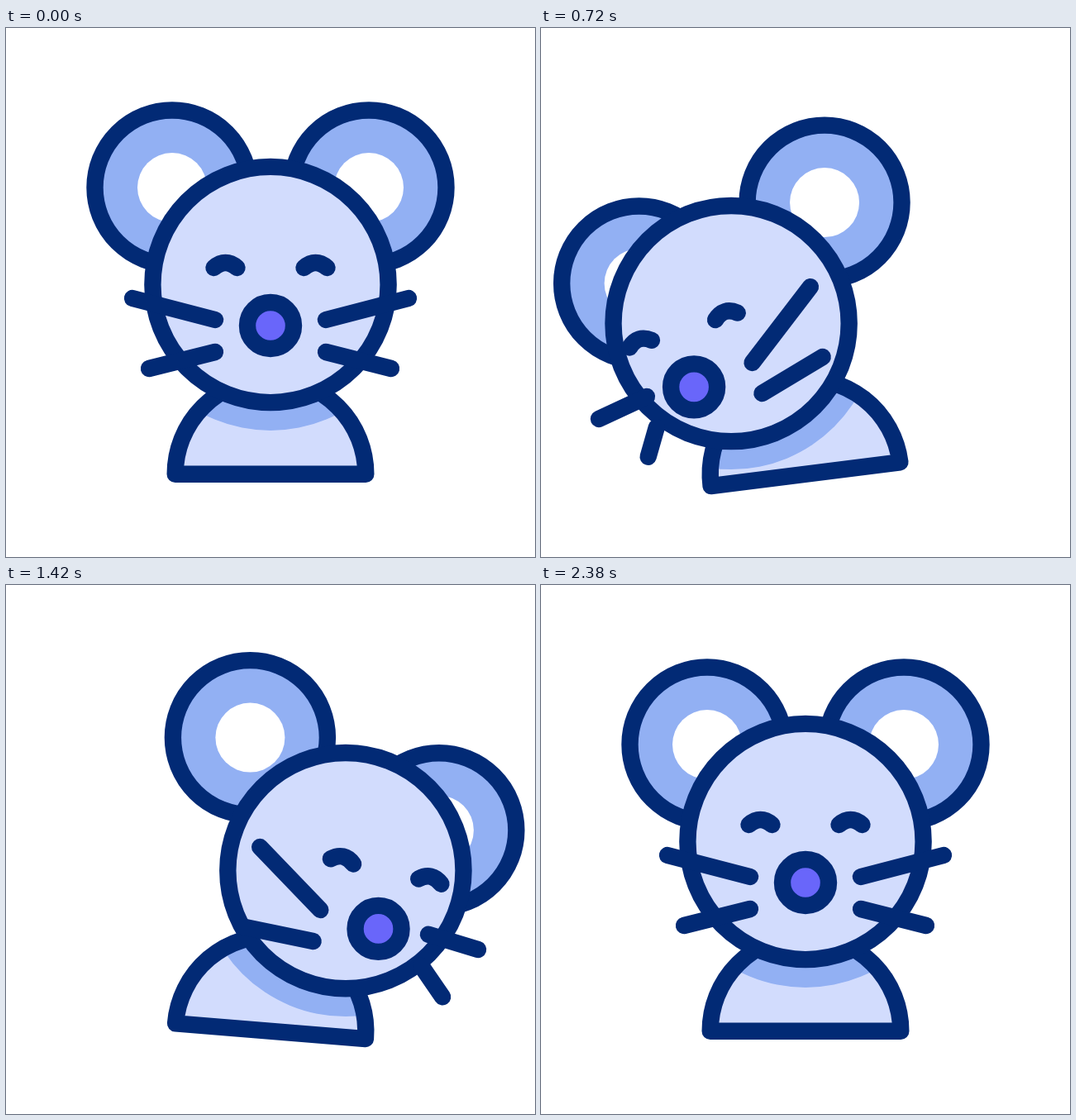
Write an HTML page with a canvas that moves like this. It is 640 px wide and 640 px high and loops after 2400 ms.

```html
<!DOCTYPE html>
<html lang="en">
<head>
<meta charset="utf-8">
<title>Mouse</title>
<style>
html, body { margin: 0; width: 100%; height: 100%; overflow: hidden; background: #fff; }
canvas { display: block; }
</style>
</head>
<body>
<canvas id="stage" width="640" height="640"></canvas>
<script>
const ctx = document.getElementById('stage').getContext('2d');
const LOOP = 2400, DEG = Math.PI / 180;
const NAVY = '#022a75', PALE = '#d2dcfd', BLUE = '#92b0f3', VIOLET = '#6966fa';

// Poses: rest, lean left, swing right, return, nod up, nod down, rest.
const TIMES = [0, 320, 610, 720, 1140, 1410, 1660, 1820, 2000, 2190, 2380];

// Smooth curve through the poses, with zero speed at both ends.
function track(...v) {
  const speed = i => (v[i + 1] - v[i]) / (TIMES[i + 1] - TIMES[i]);
  const slopes = v.map((_, i) => {
    if (i === 0 || i === v.length - 1) return 0;
    const before = TIMES[i] - TIMES[i - 1], after = TIMES[i + 1] - TIMES[i];
    return (after * speed(i - 1) + before * speed(i)) / (before + after);
  });
  return t => {
    const next = TIMES.findIndex(k => k > t);
    if (next < 0) return v[v.length - 1];
    const i = next - 1, span = TIMES[next] - TIMES[i], s = (t - TIMES[i]) / span;
    const blend = s * s * (3 - 2 * s);
    return v[i] * (1 - blend) + v[next] * blend +
      span * s * (1 - s) * (slopes[i] * (1 - s) - slopes[next] * s);
  };
}

const bodyTilt = track(0, -4, -7.5, -7.2, 2.3, 4.7, 1.9, 0.4, 0, 0, 0);
const head = {
  x: track(0, -53, -93, -90, 54, 92, 21, -6, 0, 0, 0),
  y: track(0, 21, 38, 47, 45.5, 36, 7.5, -3, -7, 11, 0),
};
const ears = [
  { left: 201,
    x: track(0, -53, -88, -82.5, 92.5, 96, 29, -4, 0, 0, 0),
    y: track(0, 63, 106, 116, 21, -8, -2, 9, 26, 3, 0) },
  { left: 439,
    x: track(0, -55, -93, -96, 62.5, 86, 24, -4, 0, 0, 0),
    y: track(0, 0.5, 11, 18, 115.5, 106, 22, 11, 26, 3, 0) },
];
const face = {
  x: track(0, -70.5, -144, -148.5, 72, 141, 62.5, 12, 0, 0, 0),
  y: track(0, 26.5, 60, 75.5, 74.5, 58, 11.8, -17, -30, 30, 0),
  tilt: track(0, -10, -16.5, -17.8, 8.5, 13, 3, 0.5, 0, 0, 0),
};
// Whisker roots are relative to the point between the eyes.
const whiskers = [
  { root: [-67, 66], reach: [-100, -26],
    turn: track(0, -20.4, -37, -39.6, 26.6, 32, 8.7, -10, -21, 10, 0),
    size: track(1, 0.77, 0.63, 0.62, 0.94, 1.02, 1, 0.97, 0.945, 1, 1) },
  { root: [-67, 105], reach: [-80, 20],
    turn: track(0, -25, -52, -60, 19, 26, 7, -9, -18.7, 10, 0),
    size: track(1, 0.67, 0.48, 0.45, 0.97, 1.05, 1.01, 1, 1.01, 1, 1) },
  { root: [67, 66], reach: [100, -26],
    turn: track(0, -22.2, -37, -38, 20.5, 32, 6.4, 18, 33, -10, 0),
    size: track(1, 1.05, 1.11, 1.12, 0.565, 0.6, 0.88, 0.95, 0.98, 1, 1) },
  { root: [67, 105], reach: [79, 20],
    turn: track(0, -26.7, -43, -45.3, 32, 42, 8, 12, 19, -10, 0),
    size: track(1, 1, 1.05, 1.05, 0.54, 0.55, 0.88, 1, 1.09, 1, 1) },
];

function rotate([x, y], degrees) {
  const c = Math.cos(degrees * DEG), s = Math.sin(degrees * DEG);
  return [x * c - y * s, x * s + y * c];
}

function disc(x, y, r, fill, outlined) {
  ctx.beginPath();
  ctx.arc(x, y, r, 0, 2 * Math.PI);
  ctx.fillStyle = fill;
  ctx.fill();
  if (outlined) ctx.stroke();
}

function drawBody(tilt, headX, headY) {
  const dome = new Path2D(), start = (180 + tilt) * DEG;
  dome.arc(320, 539.7, 115.3, start, start + Math.PI);
  dome.closePath();
  ctx.fillStyle = PALE;
  ctx.fill(dome);
  ctx.save();
  ctx.clip(dome);
  disc(headX, headY, 176.5, BLUE);
  ctx.restore();
  ctx.stroke(dome);
}

function drawFace(t) {
  const tilt = face.tilt(t);
  ctx.save();
  ctx.translate(320 + face.x(t), 287 + face.y(t));
  for (const side of [-1, 1]) {
    ctx.save();
    ctx.rotate(tilt * DEG);
    ctx.translate(side * 54.5, 0);
    ctx.beginPath();
    ctx.moveTo(-14, 3);
    ctx.quadraticCurveTo(0, -9, 14, 3);
    ctx.stroke();
    ctx.restore();
  }
  for (const w of whiskers) {
    const [x, y] = rotate(w.root, tilt);
    const [dx, dy] = rotate(w.reach, w.turn(t));
    const size = w.size(t);
    ctx.beginPath();
    ctx.moveTo(x, y);
    ctx.lineTo(x + dx * size, y + dy * size);
    ctx.stroke();
  }
  disc(...rotate([0, 73], tilt * 0.6), 28, VIOLET, true);
  ctx.restore();
}

function draw(t) {
  ctx.fillStyle = '#fff';
  ctx.fillRect(0, 0, 640, 640);
  ctx.strokeStyle = NAVY;
  ctx.lineWidth = 20.4;
  ctx.lineCap = ctx.lineJoin = 'round';
  for (const ear of ears) {
    const x = ear.left + ear.x(t), y = 193 + ear.y(t);
    disc(x, y, 93.5, BLUE, true);
    disc(x, y, 42, '#fff');
  }
  const headX = 320 + head.x(t), headY = 310.5 + head.y(t);
  drawBody(bodyTilt(t), headX, headY);
  disc(headX, headY, 142.6, PALE, true);
  drawFace(t);
}

function frame() {
  draw(performance.now() % LOOP);
  requestAnimationFrame(frame);
}
frame();
</script>
</body>
</html>
```
